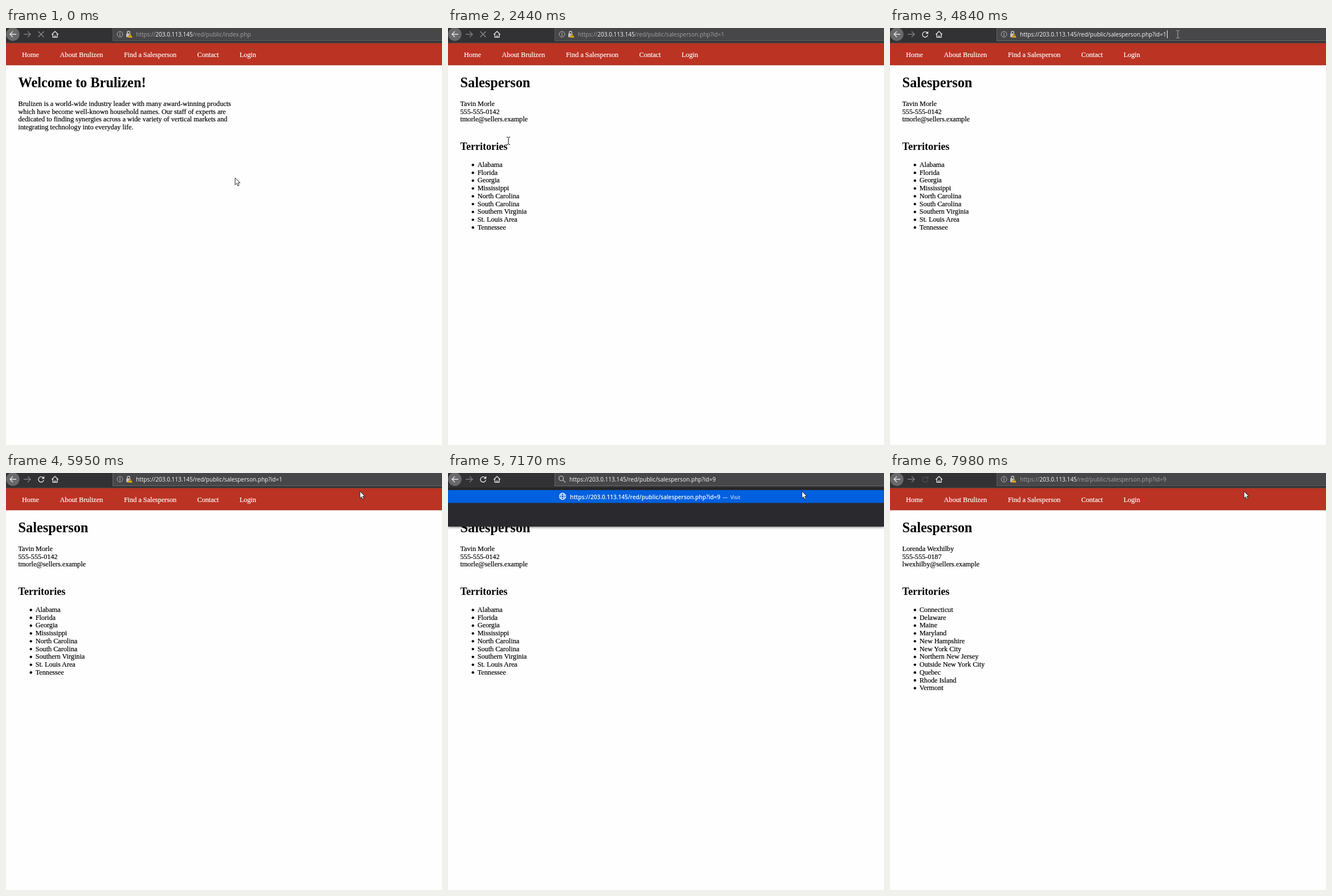
Recreate the animation shown at these times as an HTML page. Size 765 by 732 pixels, loop 8 s.

```html
<!DOCTYPE html>
<html lang="en">
<head>
<meta charset="utf-8">
<title>Browsing salespeople</title>
<style>
  html, body { margin: 0; width: 100%; height: 100%; overflow: hidden; background: #fefefe; }
  svg { display: block; }
  text { font: 12.19px "Liberation Serif", "Times New Roman", serif; white-space: pre; stroke: #000; stroke-width: .2; }
  .h1 { font-size: 24.3px; font-weight: bold; stroke: none; }
  .h2 { font-size: 18.1px; font-weight: bold; stroke: none; }
  .strong { font-weight: bold; stroke: none; }
  .link { fill: #00e; stroke: #00e; text-decoration: underline; }
  .nav { fill: #fff; stroke: #fff; }
  .ui { font: 10.05px "Open Sans", "Noto Sans", sans-serif; fill: #f9f9fa; stroke: none; }
  .hit { font-weight: 600; }
  .line { fill: none; stroke: #e4e4e6; stroke-width: 1.4; }
  .pointer { fill: #fff; stroke: #111; stroke-width: .9; }
  #ibeam { fill: none; stroke: #fff; mix-blend-mode: difference; }
  #panel > rect:first-child { filter: drop-shadow(0 1px 2px #0009); }
</style>
</head>
<body>
<svg width="765" height="732" viewBox="0 0 765 732">
  <rect width="765" height="732" fill="#fefefe"/>
  <g id="pages"></g>

  <rect y="26.5" width="765" height="38.5" fill="#bb3323"/>
  <rect y="64.4" width="765" height="1" fill="#a32c1e"/>
  <g id="nav"></g>

  <g id="panel">
    <rect y="26" width="765" height="68" fill="#2a2a2e"/>
    <rect y="30" width="765" height="22.5" fill="#0060df"/>
    <g class="line" style="stroke:#fff;stroke-width:1.1">
      <circle cx="201" cy="41" r="5.6"/><ellipse cx="201" cy="41" rx="2.6" ry="5.6"/>
      <path d="M195.5 39h11M195.5 43h11"/>
    </g>
    <text id="hit" class="ui hit" x="214" y="45.6"></text>
    <text id="visit" class="ui" y="45.6" style="font-size:9px">—  Visit</text>
  </g>

  <rect width="765" height="25.5" fill="#323234"/>
  <rect y="25.3" width="765" height="1.3" fill="#111113"/>
  <rect id="bar" x="187.5" y="-3" width="590" height="25.5" fill="#474749" stroke="#5b5b5d"/>
  <circle cx="12" cy="11" r="11.7" fill="#69696b"/>
  <g class="line">
    <path d="M18 11H7M12 6l-5 5 5 5"/>
    <path d="M31 11h12M38 6l5 5-5 5" stroke="#7d7d80"/>
    <path id="stop" d="M56.5 6l10 10M66.5 6l-10 10" stroke="#8b8b8e"/>
    <g id="reload"><path d="M65.6 8.8A4.7 4.7 0 1 0 66.2 12.4"/><path d="M67.2 5.4v4.8h-4.8z" fill="#e4e4e6" stroke="none"/></g>
    <path d="M80.3 11.5L86 5.9l5.7 5.6M82.2 10.5v5.8h7.6v-5.8M86 16.5v-4"/>
  </g>
  <g id="identity">
    <circle cx="200" cy="11" r="4.9" class="line" style="stroke:#b5b5b7;stroke-width:1"/>
    <path d="M200 8v1.4M200 10.3v3.8" stroke="#b5b5b7" stroke-width="1.2"/>
    <path d="M212.7 10V8a2.3 2.3 0 0 1 4.6 0v2" class="line" style="stroke:#c4c4c6"/>
    <rect x="211" y="9.6" width="8" height="6.6" rx="1" fill="#c4c4c6"/>
    <path d="M217.8 9.4l4.4 7.6h-8.8z" fill="#ffbf00" stroke="#474749" stroke-width=".6"/>
    <path d="M217.8 12v2.2M217.8 15v1" stroke="#333"/>
  </g>
  <g id="search" class="line" style="stroke:#b5b5b7"><circle cx="198.6" cy="9.4" r="4"/><path d="M201.5 12.3l4.6 4.4"/></g>
  <rect id="selection" x="228" y="4" height="14" fill="#fff"/>
  <text id="url" class="ui" y="15"><tspan>https://</tspan><tspan fill="#f9f9fa">203.0.113.145</tspan><tspan></tspan></text>
  <rect id="caret" x="486" y="4" width="1" height="14" fill="#f9f9fa"/>

  <g id="cursor">
    <path id="arrow" class="pointer" d="M0 0v12.4l2.9-2.7 2 4.5 2.1-1-2-4.3h3.8z"/>
    <path id="hand" class="pointer" d="M-1.2 1a1.2 1.2 0 0 1 2.4 0v5l5 1.2q2 .6 1.7 2.8l-1 6H.4L-4 10q.4-1.8 2.8 0z"/>
    <path id="ibeam" d="M-3-6.5h2l1 1 1-1h2M0-5.5v11M-3 6.5h2l1-1 1 1h2"/>
  </g>
</svg>
<script>
const $ = id => document.getElementById(id);
const show = (id, on) => { $(id).style.display = on ? '' : 'none'; };
const LOOP = 8000, LINE = 13.74;

const text = (x, y, s, cls = '') => `<text x="${x}" y="${y}" class="${cls}">${s}</text>`;
const lines = (x, y, list) => list.map((s, i) => text(x, y + i * LINE, s)).join('');
const dot = y => `<circle cx="43.7" cy="${y - 3.6}" r="2.2"/>`;
const square = y => `<rect x="41" y="${y - 6}" width="5" height="5"/>`;

const home = () => text(21.5, 104, 'Welcome to Brulizen!', 'h1') + lines(21.5, 137, [
  'Brulizen is a world-wide industry leader with many award-winning products',
  'which have become well-known household names. Our staff of experts are',
  'dedicated to finding synergies across a wide variety of vertical markets and',
  'integrating technology into everyday life.']);

const [tavin, felmer, odele, marisella, corrie, lorenda] = ['Tavin Morle', 'Felmer Dastwick',
  'Odele Farnby', 'Marisella Ostin', 'Corrie Veldano', 'Lorenda Wexhilby'];

// Each state is followed by its salesperson, or by [area, salesperson] pairs.
const states = [
  ['Alabama (AL)', tavin], ['Alaska (AK)', felmer], ['Arizona (AZ)', odele], ['Arkansas (AR)', marisella],
  ['California (CA)', ['Northern California', felmer], ['Southern California', corrie]],
  ['Colorado (CO)', odele], ['Connecticut (CT)', lorenda], ['Delaware (DE)', lorenda],
  ['Florida (FL)', tavin], ['Georgia (GA)', tavin], ['Hawaii (HI)', odele], ['Idaho (ID)', odele],
  ['Illinois (IL)', ['Chicago Metro', corrie]]];

function directory() {
  let y = 189;
  let out = text(21.5, 104, 'Find a Salesperson', 'h1') +
    text(21.5, 137, 'Use the list below to find a salesperson nearby. We are ready to serve you!') +
    text(21.5, 163, 'UNITED STATES', 'strong');
  for (const [state, ...items] of states) {
    out += text(21.5, y, state);
    for (const item of items) {
      out += square(y + LINE);
      [item].flat().forEach((s, i, all) => {
        out += text(51.7, y += LINE, s, i == all.length - 1 ? 'link' : '');
      });
    }
    y += LINE + 12.1;
  }
  return out;
}

const profile = (contact, areas) => text(21.5, 104, 'Salesperson', 'h1') + lines(21.5, 137, contact) +
  text(21.5, 213.5, 'Territories', 'h2') + lines(51.7, 244, areas) +
  areas.map((_, i) => dot(244 + i * LINE)).join('');

const pages = [home(), directory(),
  profile([tavin, '555-555-0142', 'tmorle@sellers.example'],
    ['Alabama', 'Florida', 'Georgia', 'Mississippi', 'North Carolina', 'South Carolina',
      'Southern Virginia', 'St. Louis Area', 'Tennessee']),
  profile([lorenda, '555-555-0187', 'lwexhilby@sellers.example'],
    ['Connecticut', 'Delaware', 'Maine', 'Maryland', 'New Hampshire', 'New York City',
      'Northern New Jersey', 'Outside New York City', 'Quebec', 'Rhode Island', 'Vermont'])];
$('pages').innerHTML = pages.map((p, i) => `<g id="page${i}">${p}</g>`).join('');

$('nav').innerHTML = [[28, 'Home'], [94.5, 'About Brulizen'], [207, 'Find a Salesperson'],
  [335.5, 'Contact'], [409.7, 'Login']].map(([x, s]) => text(x, 51, s, 'nav')).join('');

// Timed states: [start, value], held until the next entry.
const pageAt = [[0, 0], [980, 1], [2320, 2], [7580, 3]];
const pathAt = [[0, 'index.php'], [980, 'territories.php'], [2320, 'salesperson.php?id=1'],
  [6380, 'salesperson.php?id='], [6930, 'salesperson.php?id=9']];
const modeAt = [[0, 'idle'], [3920, 'selected'], [4840, 'edit'], [6380, 'typing'], [7320, 'idle']];
const buttonAt = [[0, 'stop'], [130, 'dim'], [535, 'ready'], [980, 'stop'], [1500, 'dim'], [1890, 'ready'],
  [2320, 'stop'], [3130, 'dim'], [3520, 'ready'], [7450, 'stop'], [7980, 'dim']];
const current = (list, t) => list.findLast(([start]) => t >= start)[1];

// Pointer path: [time, x, y], sampled in coarse steps.
const STEP = 135;
const route = [[0, 402, 263], [675, 255, 49], [945, 255, 49], [1215, 377, 287], [1350, 377, 287],
  [1890, 120, 199], [2025, 103, 199], [2295, 103, 199], [2430, 106, 198], [2565, 106, 198],
  [2835, 455, 27], [3105, 455, 27], [3645, 522, 11], [3915, 522, 11], [4050, 632, 40],
  [4320, 634, 43], [4725, 505, 11], [4860, 505, 11], [5400, 621, 32], [LOOP, 621, 32]];

function pointer(t) {
  const s = Math.floor((t + 5) / STEP) * STEP;
  const i = Math.max(1, route.findIndex(([time]) => time >= s));
  const [t0, x0, y0] = route[i - 1], [t1, x1, y1] = route[i];
  const k = (s - t0) / (t1 - t0);
  return [x0 + (x1 - x0) * k, y0 + (y1 - y0) * k];
}

function shapeAt(x, y, page) {
  if (y < 23) return 'ibeam';
  if (page == 0 && y < 65) return 'hand';
  if (x < 115 && y < 215) return page == 1 ? 'hand' : 'ibeam';
  return 'arrow';
}

const url = $('url'), [scheme, host, path] = url.children;

function draw(t) {
  const page = current(pageAt, t), mode = current(modeAt, t), button = current(buttonAt, t);
  const typing = mode == 'typing', idle = mode == 'idle';
  pages.forEach((_, i) => show('page' + i, i == page));

  path.textContent = '/red/public/' + current(pathAt, t);
  const ink = { idle: '#a1a1a3', selected: '#0a6fd0' }[mode] || '#f9f9fa';
  scheme.setAttribute('fill', ink);
  path.setAttribute('fill', ink);
  host.setAttribute('fill', idle ? '#f9f9fa' : ink);
  url.setAttribute('x', typing ? 213 : 228);
  $('bar').setAttribute('stroke', idle ? '#5b5b5d' : '#69696b');
  show('identity', !typing);
  show('search', typing);
  show('selection', mode == 'selected');
  $('selection').setAttribute('width', url.getComputedTextLength() + .5);
  show('caret', mode == 'edit' && t < 5950);

  show('panel', typing);
  if (typing) {
    $('hit').textContent = url.textContent;
    $('visit').setAttribute('x', 218 + $('hit').getComputedTextLength());
  }

  show('stop', button == 'stop');
  show('reload', button != 'stop');
  $('reload').setAttribute('opacity', button == 'dim' ? .16 : 1);

  const [x, y] = pointer(t), shape = shapeAt(x, y, page);
  $('cursor').setAttribute('transform', `translate(${Math.round(x)} ${Math.round(y)})`);
  for (const id of ['arrow', 'hand', 'ibeam']) show(id, id == shape);
}

const began = performance.now();
function frame() {
  draw((performance.now() - began) % LOOP);
  requestAnimationFrame(frame);
}
frame();
</script>
</body>
</html>
```
